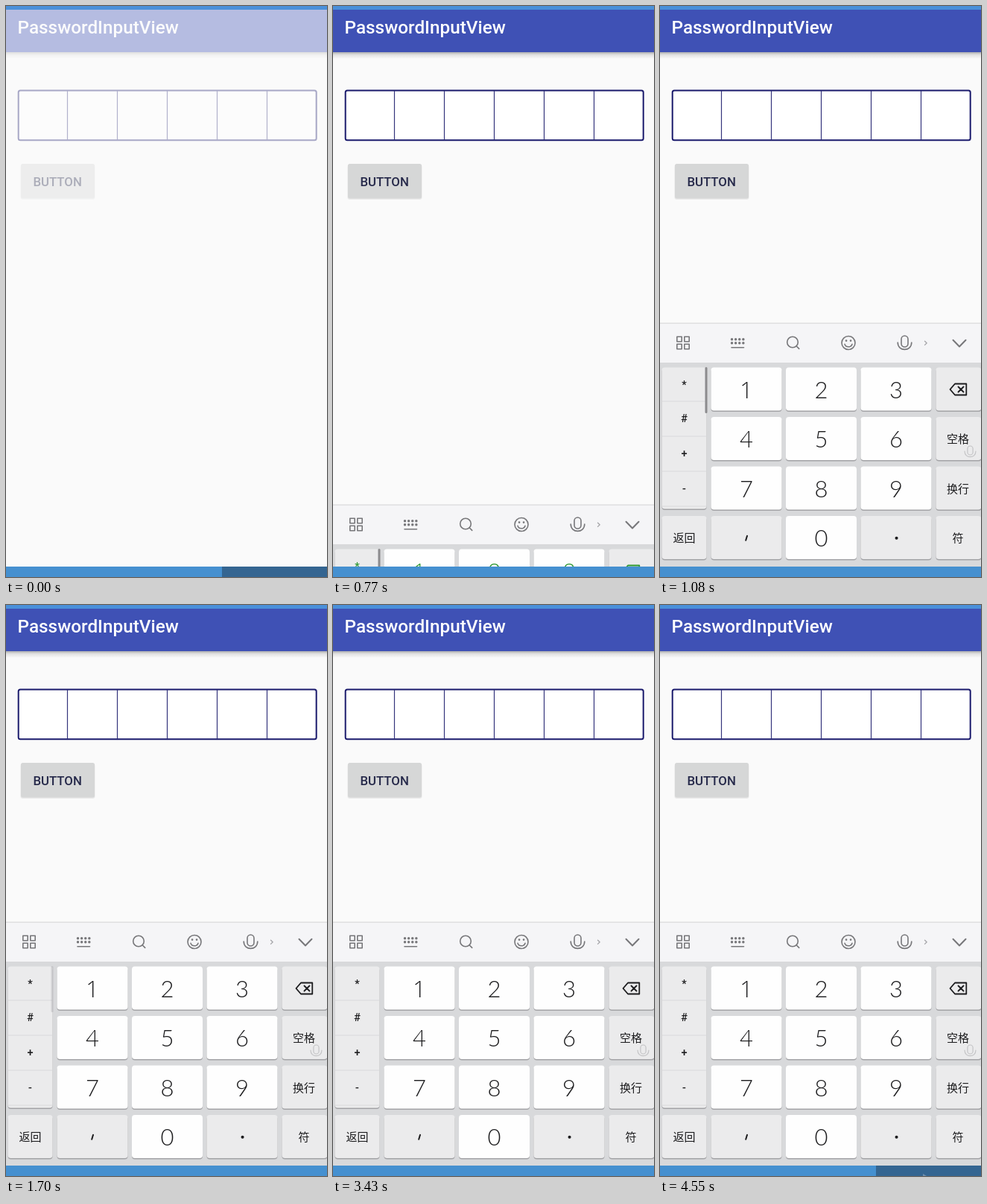
These frames come from a looping animation (431 px wide and 767 px high, 4.63 s). An HTML page:

```html
<!DOCTYPE html>
<html lang="en">
<head>
<meta charset="utf-8">
<title>Password input</title>
<style>
html, body { margin: 0; width: 100%; height: 100%; overflow: hidden; background: #fafafa; }
svg { display: block; width: 431px; height: 767px; }
text { font-family: Roboto, sans-serif; font-weight: 500; }
#keys { color: #1c1c1e; }
#keys text { text-anchor: middle; fill: currentColor; }
#keys .digit { font-family: Lato, sans-serif; font-weight: 300; font-size: 31px; }
#keys .one { font-family: "Open Sans", sans-serif; font-size: 30.5px; }
#keys .cjk { font-family: "Noto Sans CJK SC", "Noto Sans CJK", sans-serif; font-size: 15px; }
#keys .sign { font-size: 14.5px; }
.line { fill: none; stroke-linecap: round; stroke-linejoin: round; }
</style>
</head>
<body>
<svg viewBox="0 0 431 767">
  <defs>
    <linearGradient id="shade" x2="0" y2="1">
      <stop stop-color="#000" stop-opacity=".3"/>
      <stop offset=".4" stop-color="#000" stop-opacity=".1"/>
      <stop offset="1" stop-color="#000" stop-opacity="0"/>
    </linearGradient>
    <g id="mic" class="line">
      <rect x="-4.5" y="-10" width="9" height="15" rx="4.5"/>
      <path d="M-9.3-1C-9.3 11.5 9.3 11.5 9.3-1"/>
    </g>
  </defs>
  <rect width="431" height="767" fill="#fafafa"/>
  <g id="page">
    <rect y="62" width="431" height="9" fill="url(#shade)"/>
    <rect width="431" height="62" fill="#3f51b5"/>
    <text x="15.5" y="37" font-size="24.3" fill="#fff">PasswordInputView</text>
    <rect x="16.7" y="113.5" width="400" height="66.7" rx="2.5" fill="#fff" stroke="#1a1a6c" stroke-width="2"/>
    <path id="dividers" stroke="#34347c" stroke-width="1.2"/>
    <rect x="19.5" y="213" width="100" height="47" rx="3" fill="#000" opacity=".07"/>
    <rect x="20" y="212" width="99" height="46.5" rx="2.5" fill="#d6d7d7"/>
    <text x="36.5" y="241.7" font-size="16.8" fill="#26294a">BUTTON</text>
  </g>
  <g id="board">
    <rect y="426" width="431" height="53" fill="#f5f5f7"/>
    <rect y="425.5" width="431" height="1.3" fill="#dcdcde"/>
    <rect y="479" width="431" height="290" fill="#d8d9db"/>
    <g id="tools" class="line" stroke="#77777a" stroke-width="1.6">
      <path d="M22.8 444.3h6.4v6.4h-6.4zM32.8 444.3h6.4v6.4h-6.4zM22.8 454.3h6.4v6.4h-6.4zM32.8 454.3h6.4v6.4h-6.4z"/>
      <path d="M96 458.7h16.5"/>
      <path d="M96.5 447.7h16M96.5 452.7h16" stroke-width="3.4" stroke-dasharray=".1 5"/>
      <circle cx="178" cy="451.5" r="7.3"/>
      <path d="M183.3 457l3.4 3.4"/>
      <circle cx="253" cy="452.5" r="9"/>
      <path d="M248 454.2C249 459 257 459 258 454.2"/>
      <path d="M250 449.6h.1M256 449.6h.1" stroke-width="2.6"/>
      <use href="#mic" x="328.5" y="453"/>
      <path d="M355.5 450.2l2.7 2.6-2.7 2.6" stroke="#a5a5a8" stroke-width="1.3"/>
      <path d="M393.5 448.8l8.5 8.7 8.5-8.7" stroke-width="2"/>
    </g>
    <g id="keys"></g>
    <rect id="scroll" x="60.5" y="485" width="3" height="62" rx="1.5" fill="#8c8c8e"/>
  </g>
  <rect width="431" height="5" fill="#4a90da"/>
  <rect y="753" width="431" height="14" fill="#4590d0"/>
  <g id="dark">
    <rect x="290" y="753" width="141" height="14" fill="#346591"/>
    <path id="tip" d="M353 764l5 3h-5z" fill="#6f8fae"/>
  </g>
</svg>
<script>
const $ = id => document.getElementById(id);
const clamp = v => Math.max(0, Math.min(1, v));

$('dividers').setAttribute('d', [0, 1, 2, 3, 4].map(i => `M${82.5 + 67 * i} 114v66`).join(''));

const key = (x, y, w, h, fill) =>
  `<rect x="${x}" y="${y + 1.6}" width="${w}" height="${h}" rx="4" fill="#a3a3a6"/>` +
  `<rect x="${x}" y="${y}" width="${w}" height="${h}" rx="4" fill="${fill}"/>`;
const label = (x, y, s, kind) => `<text x="${x}" y="${y}" class="${kind}">${s}</text>`;

const WHITE = '#fefefe', GREY = '#ebebec';
const rowY = r => 485.5 + 66.5 * r;
const colX = c => 68.5 + 100.5 * c;
const digit = (n, c, r) =>
  label(colX(c) + 47.5, rowY(r) + 41, n, n === 1 ? 'digit one' : 'digit');

let out = key(2.5, 485.5, 60, 190, GREY);
['*', '#', '+', '-'].forEach((s, i) => {
  const y = 531 + 47 * i;
  out += `<path d="M3 ${y}h59" stroke="#d9d9db"/>`;
  out += label(32.5, [513.5, 559, 606, 653][i], s, 'sign');
});
for (let r = 0; r < 4; r++) {
  for (let c = 0; c < 3; c++) {
    const isDigit = r < 3 || c === 1;
    out += key(colX(c), rowY(r), 95, 58, isDigit ? WHITE : GREY);
    if (isDigit) out += digit(r < 3 ? r * 3 + c + 1 : 0, c, r);
  }
  out += key(370.5, rowY(r), 61, 58, GREY);
  out += label(400, rowY(r) + 35, ['', '空格', '换行', '符'][r], 'cjk');
}
out += key(2.5, rowY(3), 60, 58, GREY) + label(32.5, 720, '返回', 'cjk');
out += `<g class="line" stroke="currentColor" stroke-width="1.8">
  <path d="M389.5 515l6.5-7.5h15.3v15H396zM400.5 511.5l7 7M407.5 511.5l-7 7"/>
  <path d="M117 711.8l-1.8 6" stroke-width="2"/>
  <path d="M317.5 714.8h.1" stroke-width="4"/></g>
  <use href="#mic" transform="translate(416.5 599) scale(.8)" stroke="#c4c4c6" stroke-width="1.5"/>`;
$('keys').innerHTML = out;

// Screen recording: the picture only updates at these times.
const STEPS = [0, 70, 360, 440, 520, 600, 690, 770, 850, 920, 1000, 1080, 1240, 1320,
  1470, 2020, 3670, 3750, 3830, 3910, 4000, 4080, 4160];
const LOOP = 4630;

function draw(now) {
  const ms = now % LOOP;
  const t = STEPS.findLast(s => s <= ms) ?? 0;
  const fade = t < 70 ? .37 : t < 360 ? .42 : clamp(.845 + (t - 360) / 1000);
  const slide = 244 * (1 - clamp((t - 770) / 310)) ** 2.5;
  $('page').setAttribute('opacity', fade);
  $('board').setAttribute('visibility', t < 770 ? 'hidden' : 'visible');
  $('board').setAttribute('transform', `translate(0 ${slide.toFixed(1)})`);
  $('keys').style.color = t < 850 ? '#2c972f' : '';
  $('scroll').setAttribute('opacity',
    t < 1240 ? 1 : t < 1320 ? .75 : t < 1470 ? .5 : t < 2020 ? .25 : 0);
  $('dark').setAttribute('opacity',
    t < 2000 ? 1 - clamp((t - 360) / 330) : clamp((t - 3590) / 570));
  $('tip').setAttribute('opacity', t < 2000 ? 0 : 1);
}

const start = performance.now();
function tick() {
  draw(performance.now() - start);
  requestAnimationFrame(tick);
}
tick();
</script>
</body>
</html>
```
